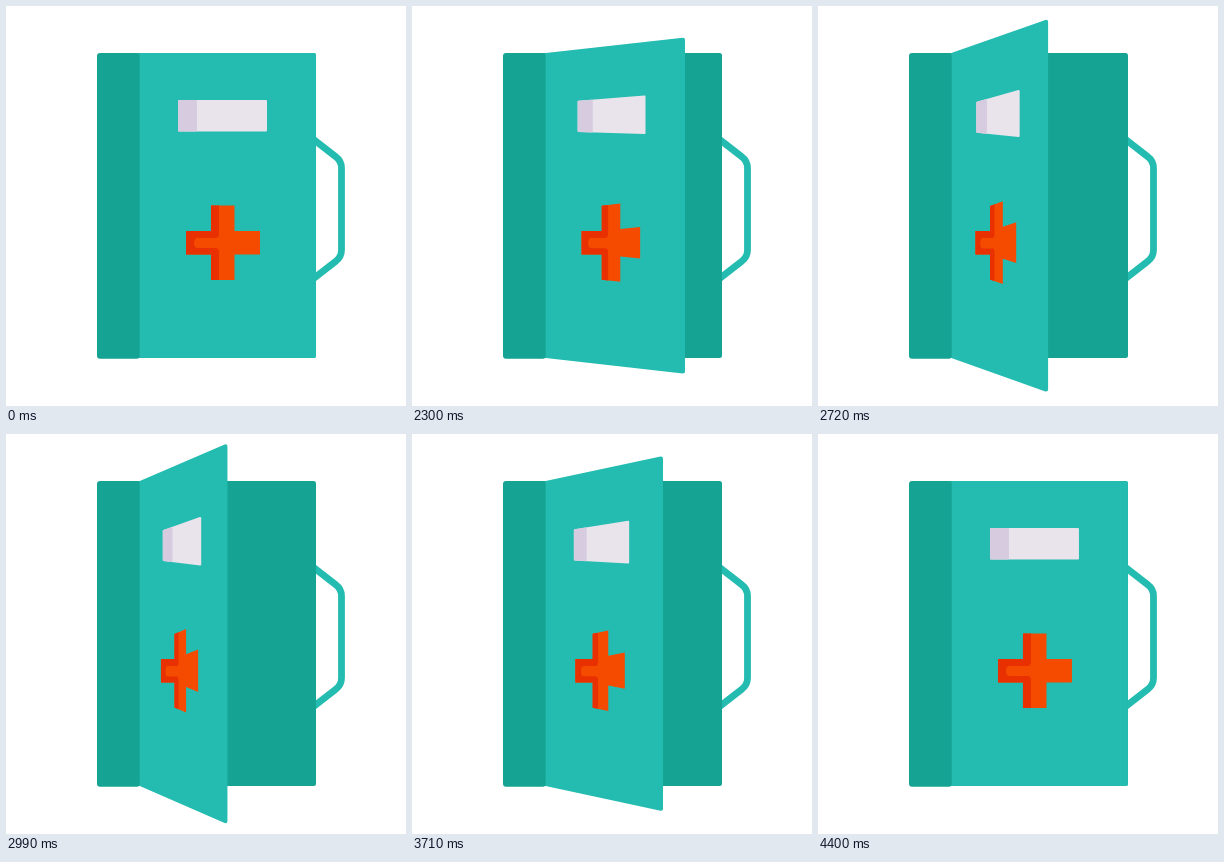
Animation, 400 px wide and 400 px high, one loop 4430 ms. Source, as an HTML page without scripts:

```html
<!DOCTYPE html>
<html lang="en">
<head>
<meta charset="utf-8">
<title>First aid case</title>
<style>
  html, body { margin: 0; width: 100%; height: 100%; overflow: hidden; background: #fff; }
  svg { display: block; width: 100%; height: 100%; }

  .dark { fill: #15a493; }
  .handle { fill: none; stroke: #24bcb0; stroke-width: 6.8; }

  /* Every part of the cover morphs between three poses on one shared timeline. */
  .cover path {
    d: var(--shut);
    stroke-linejoin: round;
    animation: swing 4430ms infinite;
  }
  .door { fill: #24bcb0; stroke: #24bcb0; stroke-width: 4; }
  .label { fill: #e9e4ec; stroke: #e9e4ec; stroke-width: 2; }
  .label-edge { fill: #d6cbdf; stroke: #d6cbdf; stroke-width: 2; }
  .cross { fill: #f44b00; }
  .cross-shade { fill: #e93000; }

  .door {
    --shut: path("M134 49 L308 49 L308 350 L134 350 Z");
    --ajar: path("M134 49 L295.8 44 L295.8 355.1 L134 350 Z");
    --open: path("M134 49 L217.8 11.6 L217.8 387.9 L134 350 Z");
  }
  .label {
    --shut: path("M173 95 L260 95 L260 124.5 L173 124.5 Z");
    --ajar: path("M170.9 95.3 L251 93.5 L251 125.3 L170.9 124.7 Z");
    --open: path("M157.5 97 L193 83.8 L193 130.6 L157.5 126 Z");
  }
  .label-edge {
    --shut: path("M173 95 L190 95 L190 124.5 L173 124.5 Z");
    --ajar: path("M170.9 95.3 L186.6 94.9 L186.6 124.8 L170.9 124.7 Z");
    --open: path("M157.5 97 L165 94.2 L165 127 L157.5 126 Z");
  }
  .cross {
    --shut: path("M180 225 L205 225 L205 199.5 L228.5 199.5 L228.5 225 L254 225 L254 248.5 L228.5 248.5 L228.5 274 L205 274 L205 248.5 L180 248.5 Z");
    --ajar: path("M176.6 225 L200 225 L200 199.6 L221.8 198.9 L221.8 224.4 L245.5 223.7 L245.5 249.8 L221.8 249.1 L221.8 274.6 L200 273.9 L200 248.5 L176.6 248.5 Z");
    --open: path("M154.5 225 L167.8 225 L167.8 200 L179.2 194.8 L179.2 220.2 L191 215.2 L191 258.2 L179.2 253.2 L179.2 278.5 L167.8 273.5 L167.8 248.5 L154.5 248.5 Z");
  }
  .cross-shade {
    --shut: path("M180 225 L205 225 L205 199.5 L213 199.5 L213 228 Q213 232 209 232 L192 232 Q188 232 188 237 Q188 242 192 242 L209 242 Q213 242 213 246 L213 274 L205 274 L205 248.5 L180 248.5 Z");
    --ajar: path("M176.6 225 L200 225 L200 199.6 L207.4 199.3 L207.4 228 Q207.4 232 203.7 232 L187.8 232 Q184.1 232 184.1 237 Q184.1 242 187.8 242 L203.7 242 Q207.4 242 207.4 246 L207.4 274.2 L200 273.9 L200 248.5 L176.6 248.5 Z");
    --open: path("M154.5 225 L167.8 225 L167.8 200 L171.8 198.2 L171.8 228 Q171.8 232 169.8 232 L161 232 Q159 232 159 237.2 Q159 242.5 161 242.5 L169.8 242.5 Q171.8 242.5 171.8 246.5 L171.8 275.3 L167.8 273.5 L167.8 248.5 L154.5 248.5 Z");
  }

  /* Rest, swing open, fall shut, small rebound. */
  @keyframes swing {
    0% { d: var(--shut); animation-timing-function: linear; }
    45.147% { d: var(--shut); animation-timing-function: cubic-bezier(.25, .1, .25, 1); }
    72.235% { d: var(--open); animation-timing-function: cubic-bezier(.75, 0, .75, .9); }
    90.858% { d: var(--shut); animation-timing-function: cubic-bezier(.25, .1, .25, 1); }
    94.808% { d: var(--ajar); animation-timing-function: cubic-bezier(.75, 0, .75, .9); }
    99.4%, 100% { d: var(--shut); }
  }
</style>
</head>
<body>
<svg viewBox="0 0 400 400">
  <path class="handle" d="M306 132.3 L329.5 150.5 Q335.5 155 335.5 162 V244 Q335.5 251 329.5 255.5 L306 273.7"/>
  <rect class="dark" x="130" y="47" width="180" height="305" rx="2.5"/>
  <g class="cover">
    <path class="door"/>
    <path class="label"/>
    <path class="label-edge"/>
    <path class="cross"/>
    <path class="cross-shade"/>
  </g>
  <rect class="dark" x="91" y="47" width="42.7" height="305.8" rx="3"/>
</svg>
</body>
</html>
```
